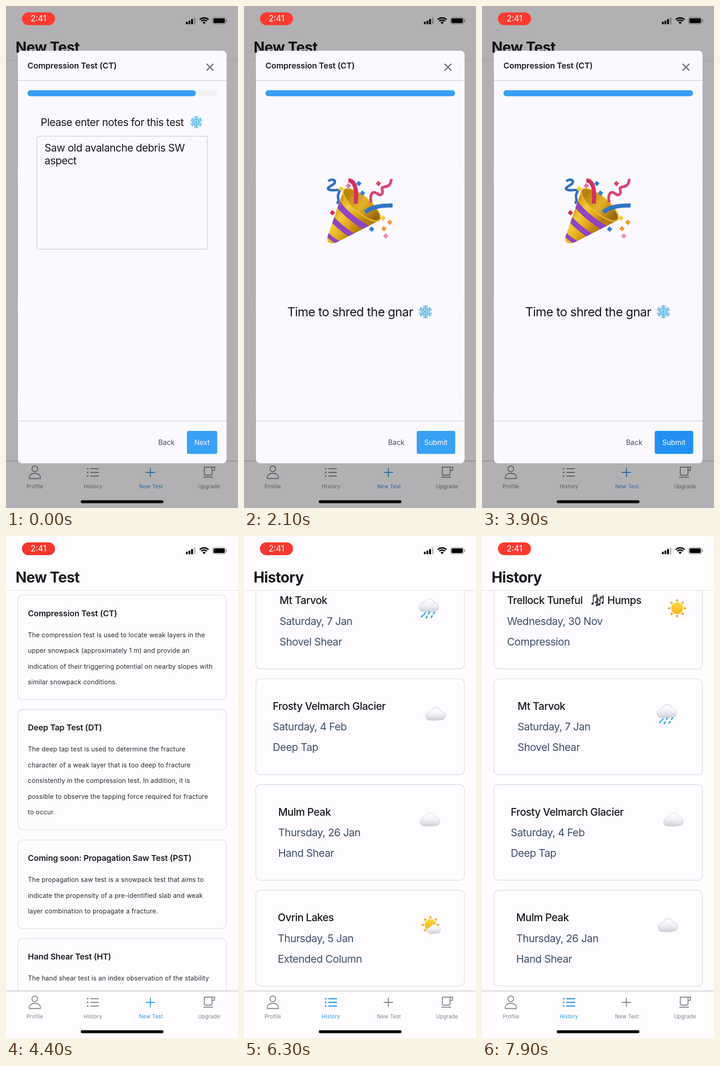
An HTML page with a canvas for the animation above (8 s loop, 509x1100 px).

```html
<!DOCTYPE html>
<html lang="en">
<head>
<meta charset="utf-8">
<title>Snow test log</title>
<style>
  html, body { margin: 0; width: 100%; height: 100%; overflow: hidden; background: #fefcff; }
  canvas { display: block; width: 509px; height: 1100px; }
</style>
</head>
<body>
<canvas id="stage"></canvas>
<script>
const W = 509, H = 1100, LOOP = 8000, STEP = 100;
const SWITCH = 1400, POP = 1600, CLOSE = 4200, HISTORY = 5900, INSERT = 7600;
const PAGE = '#fefcff', INK = '#1b1a1e', SLATE = '#3f4f6a', GRAY = '#7f7e83', BLUE = '#38a0f5';

const canvas = document.getElementById('stage');
const dpr = window.devicePixelRatio || 1;
canvas.width = W * dpr;
canvas.height = H * dpr;
const ctx = canvas.getContext('2d');

// Text styles: weight, size, letter spacing in em
const STYLE = {
  title: [700, 32, -0.02],
  head: [600, 17.8, -0.006],
  body: [400, 14, 0.013],
  large: [400, 23, -0.023],
  name: [500, 22.8, -0.024],
  hero: [400, 27, -0.022],
  button: [400, 15.5, 0],
  tab: [400, 11.3, 0.027],
  clock: [400, 18, 0]
};

const TESTS = [
  { y: 129.5, h: 229, title: 'Compression Test (CT)', lines: [
    'The compression test is used to locate weak layers in the',
    'upper snowpack (approximately 1 m) and provide an',
    'indication of their triggering potential on nearby slopes with',
    'similar snowpack conditions.'] },
  { y: 380.3, h: 263.7, title: 'Deep Tap Test (DT)', lines: [
    'The deep tap test is used to determine the fracture',
    'character of a weak layer that is too deep to fracture',
    'consistently in the compression test. In addition, it is',
    'possible to observe the tapping force required for fracture',
    'to occur.'] },
  { y: 666, h: 194.3, title: 'Coming soon: Propagation Saw Test (PST)', lines: [
    'The propagation saw test is a snowpack test that aims to',
    'indicate the propensity of a pre-identified slab and weak',
    'layer combination to propagate a fracture.'] },
  { y: 882, h: 200, title: 'Hand Shear Test (HT)', lines: [
    'The hand shear test is an index observation of the stability'] }
];

const RECORDS = [
  { x: 55, name: 'Trellock Tuneful', tail: 'Humps', date: 'Wednesday, 30 Nov', test: 'Compression', icon: sun, ix: 428 },
  { x: 78, name: 'Mt Tarvok', date: 'Saturday, 7 Jan', test: 'Shovel Shear', icon: rain, ix: 405.5 },
  { x: 63, name: 'Frosty Velmarch Glacier', date: 'Saturday, 4 Feb', test: 'Deep Tap', icon: cloud, ix: 420 },
  { x: 75, name: 'Mulm Peak', date: 'Thursday, 26 Jan', test: 'Hand Shear', icon: cloud, ix: 408 },
  { x: 74, name: 'Ovrin Lakes', date: 'Thursday, 5 Jan', test: 'Extended Column', icon: sunCloud, ix: 409 }
];

function text(str, x, y, style, color, align = 'left') {
  const [weight, size, spacing] = STYLE[style];
  ctx.font = `${weight} ${size}px Inter, "Noto Sans", sans-serif`;
  ctx.letterSpacing = `${spacing * size}px`;
  ctx.textAlign = align;
  ctx.fillStyle = color;
  ctx.fillText(str, x, y);
}

function box(x, y, w, h, r, fill, line, width = 1.2) {
  ctx.beginPath();
  ctx.roundRect(x, y, w, h, r);
  if (fill) { ctx.fillStyle = fill; ctx.fill(); }
  if (line) { ctx.strokeStyle = line; ctx.lineWidth = width; ctx.stroke(); }
}

function rect(x, y, w, h, fill) {
  ctx.fillStyle = fill;
  ctx.fillRect(x, y, w, h);
}

function disc(x, y, r, fill) {
  ctx.beginPath();
  ctx.arc(x, y, r, 0, 7);
  ctx.fillStyle = fill;
  ctx.fill();
}

function stroke(d, color, width, cap = 'round') {
  ctx.strokeStyle = color;
  ctx.lineWidth = width;
  ctx.lineCap = cap;
  ctx.lineJoin = 'round';
  ctx.stroke(new Path2D(d));
}

function at(x, y, scale, draw) {
  ctx.save();
  ctx.translate(x, y);
  ctx.scale(scale, scale);
  draw();
  ctx.restore();
}

function gradient(x0, y0, x1, y1, ...colors) {
  const g = ctx.createLinearGradient(x0, y0, x1, y1);
  colors.forEach((c, i) => g.addColorStop(i / (colors.length - 1), c));
  return g;
}

// ---- Pictograms ----

function snowflake(x, y, r) {
  at(x, y, r / 14, () => {
    for (const [color, width] of [['#c3e7f6', 3.2], ['#55b4e0', 1.3]]) {
      for (let i = 0; i < 6; i++) {
        ctx.save();
        ctx.rotate(i * Math.PI / 3);
        stroke('M0 0V-12.5M-3.6 -12L0 -8.6L3.6 -12M-3.8 -7.6L0 -4.2L3.8 -7.6', color, width);
        ctx.restore();
      }
    }
  });
}

function cloud(x, y, scale = 1) {
  const puffs = [[-13, 5, 8.5], [12, 3.5, 9.5], [1, -4, 10.3], [-8, 0, 8], [0, 6, 8.2], [6, 5, 8.5], [-6, 6, 8]];
  at(x, y, scale, () => {
    for (const [px, py, r] of puffs) disc(px, py, r + 0.6, '#b9bdc9');
    const fill = gradient(0, -14, 0, 14, '#ffffff', '#f1f2f6', '#cdd0da');
    for (const [px, py, r] of puffs) disc(px, py, r, fill);
  });
}

function rain(x, y) {
  cloud(x, y - 6);
  for (const [dx, dy] of [[-10, 13], [0, 11], [11, 11], [-15, 18], [-5, 20], [6, 19]]) {
    stroke(`M${x + dx + 1.5} ${y + dy - 2.5}L${x + dx - 0.8} ${y + dy + 1}`, '#35a4e6', 3);
  }
}

function sun(x, y, scale = 1) {
  at(x, y, scale, () => {
    for (let i = 0; i < 8; i++) {
      ctx.save();
      ctx.rotate(i * Math.PI / 4);
      ctx.fillStyle = '#f2a526';
      ctx.fill(new Path2D('M-3.4 -15L0 -21.5L3.4 -15Z'));
      ctx.restore();
    }
    disc(0, 0, 13, gradient(0, -13, 0, 13, '#ffd83c', '#f8b51f'));
  });
}

function sunCloud(x, y) {
  sun(x, y - 1, 0.98);
  cloud(x + 7.5, y + 8, 0.69);
}

function notes(x, y) {
  at(x, y, 1, () => {
    stroke('M4 20V3L12 1V17M4 6L12 4', '#2b2b30', 1.8);
    stroke('M19 22V7L26 4V18M19 10L26 7M14 9V23M14 9Q15 13 18 14', '#2b2b30', 1.7);
    for (const [nx, ny] of [[2.4, 21], [10.3, 18], [17, 22.5], [24.3, 19], [12.2, 24]]) disc(nx, ny, 2.4, '#2b2b30');
  });
}

function popper() {
  const cone = new Path2D('M219 402L183 506Q180 521 196 520L203 518L297 470Z');
  const gold = gradient(200, 440, 254, 482, '#d99a12', '#f4cb37', '#e3ab1c', '#b77d10');
  ctx.fillStyle = gold;
  ctx.fill(cone);
  ctx.save();
  ctx.clip(cone);
  stroke('M202 428Q226 462 272 488', '#8f46c0', 13);
  stroke('M190 462Q207 484 242 506', '#8f46c0', 12);
  stroke('M178 495Q190 511 212 521', '#8f46c0', 9);
  ctx.restore();

  ctx.beginPath();
  ctx.ellipse(258.5, 435.5, 51, 18, 0.7, 0, 7);
  ctx.fillStyle = gradient(230, 410, 290, 460, '#b9810f', '#e4b32c', '#9c6a0c');
  ctx.fill();
  ctx.strokeStyle = '#e9bd35';
  ctx.lineWidth = 2.5;
  ctx.stroke();

  stroke('M185 384C192 377 205 382 197 390C188 396 179 400 188 403C200 406 215 398 208 410C202 419 212 424 204 433', '#2f70c6', 5.5, 'butt');
  stroke('M229 382C245 383 248 405 245 433', '#d52f5f', 9, 'butt');
  stroke('M279 431C275 408 284 405 292 411C301 418 306 411 303 402C300 391 322 404 323 379', '#dc4674', 6, 'butt');
  stroke('M266 452C280 440 300 437 326 437', '#2f74cc', 9, 'butt');

  const bits = [
    [213, 401, '#f3cb34'], [229, 394, '#e873a0'], [252, 389, '#327fd8'], [260, 410, '#327fd8'],
    [295, 389, '#e04468'], [194, 453, '#d63054'], [305, 465, '#f5cc38'], [320, 474, '#ee9a35'],
    [307, 488, '#ee9a35'], [280, 489, '#327fd8'], [311, 504, '#eb8cc0']
  ];
  for (const [x, y, color] of bits) {
    ctx.save();
    ctx.translate(x, y);
    ctx.rotate(0.65);
    rect(-4.2, -4.2, 8.4, 8.4, color);
    ctx.restore();
  }
}

// ---- Screens ----

function testList() {
  for (const { y, h, title, lines } of TESTS) {
    box(26, y, 457.5, h, 10, null, '#d8d7db');
    text(title, 48, y + 46, 'head', INK);
    lines.forEach((line, i) => text(line, 48, y + 92 + i * 34.5, 'body', '#29282c'));
  }
}

function historyList(first) {
  for (let i = 0; i < 4; i++) {
    const r = RECORDS[first + i], y = 81.4 + i * 231.6;
    box(26, y, 457.5, 209.8, 10, null, '#d8d7db');
    text(r.name, r.x, y + 68, 'name', INK);
    if (r.tail) {
      notes(240, y + 46);
      text(r.tail, 275, y + 68, 'name', INK);
    }
    text(r.date, r.x, y + 113.3, 'large', SLATE);
    text(r.test, r.x, y + 158.3, 'large', SLATE);
    r.icon(r.ix, y + 77);
  }
}

function tabBar(active) {
  rect(0, 997, W, 103, PAGE);
  rect(0, 996.3, W, 1.4, '#c3c2c6');
  const color = i => i === active ? '#2a94e6' : GRAY;
  ['Profile', 'History', 'New Test', 'Upgrade'].forEach((label, i) =>
    text(label, 63.5 + i * 127.3, 1057.3, 'tab', color(i), 'center'));

  stroke('M69.5 1014.2A6.3 6.3 0 1 1 56.9 1014.2A6.3 6.3 0 1 1 69.5 1014.2M51 1035.5C50 1028 56 1024 63.2 1024C70.5 1024 76.5 1028 75.5 1035.5Z', GRAY, 1.8);
  for (const y of [1014, 1022, 1030]) {
    disc(179.2, y, 1.8, color(1));
    stroke(`M186 ${y}H203`, color(1), active === 1 ? 2.6 : 1.8);
  }
  stroke('M316.7 1012.5V1031.5M307.2 1022H326.2', color(2), 1.9);
  stroke('M435 1010.5H452V1025Q452 1028 449 1028H438Q435 1028 435 1025ZM452 1010.5H458L457 1017.5H452M433.5 1032.5H453.5', GRAY, 1.8);
}

function page(t) {
  const history = t >= HISTORY;
  rect(0, 0, W, H, PAGE);
  ctx.save();
  ctx.beginPath();
  ctx.rect(0, 119, W, 878);
  ctx.clip();
  if (history) historyList(t < INSERT ? 1 : 0);
  else testList();
  ctx.restore();
  rect(0, 118.8, W, 1.2, '#e5e3e7');
  text(history ? 'History' : 'New Test', 21, 101.5, 'title', INK);
  tabBar(history ? 1 : 2);
}

function ease(p) {
  p = Math.min(1, Math.max(0, p));
  return p * p * (3 - 2 * p);
}

function notesStep() {
  text('Please enter notes for this test', 76, 262.5, 'large', '#18171b');
  snowflake(417.5, 254.5, 14);
  box(68, 285.3, 374, 247.5, 4, null, '#c9c8cc');
  text('Saw old avalanche debris SW', 84.5, 318.7, 'large', '#18171b');
  text('aspect', 84.5, 346.7, 'large', '#18171b');
}

function doneStep(t) {
  if (t >= POP) popper();
  text('Time to shred the gnar', 95, 680, 'hero', '#18171b');
  snowflake(398, 670, 15.5);
}

function modal(t) {
  const done = t >= SWITCH;
  box(26, 98, 458, 904, 9, '#fbf9fd');
  rect(26, 162.6, 458, 1.3, '#cfced2');
  rect(26, 908.6, 458, 1.3, '#cfced2');
  text('Compression Test (CT)', 47, 137, 'head', INK);
  stroke('M440 126.7L455 141.7M455 126.7L440 141.7', '#6c6b70', 2.5, 'butt');

  box(47, 184.5, 417, 13.3, 6.6, '#f3f2f5');
  box(47, 184.5, 369.5 + 46.5 * ease((t - SWITCH) / 500), 13.3, 6.6, BLUE);

  if (done) doneStep(t);
  else notesStep();

  const pressed = t >= 3800 || (t >= 1200 && !done);
  const left = done ? 379 : 397;
  box(left, 931, 463.5 - left, 50.5, 4, pressed ? '#2290f2' : BLUE);
  text(done ? 'Submit' : 'Next', (left + 463) / 2, 962, 'button', '#fafcff', 'center');
  text('Back', left - 45, 962, 'button', SLATE, 'center');
}

function statusBar(t) {
  const glow = (1 + Math.cos(t / 2000 * 2 * Math.PI)) / 2;
  const mix = (a, b) => Math.round(a + (b - a) * glow);
  box(35, 14, 72.5, 28, 14, `rgb(${mix(221, 255)}, ${mix(48, 59)}, ${mix(42, 48)})`);
  text('2:41', 71.3, 34.3, 'clock', '#fff', 'center');

  [5.5, 8, 11.5, 15].forEach((h, i) =>
    box(394.7 + i * 5.7, 40 - h, 4, h, 1, i < 3 ? '#000' : 'rgba(0,0,0,.25)'));

  ctx.strokeStyle = '#000';
  ctx.lineCap = 'butt';
  for (const [r, width] of [[13.6, 3], [8.8, 3], [2.5, 5]]) {
    ctx.beginPath();
    ctx.arc(434.7, 39.5, r, -Math.PI * 0.75, -Math.PI * 0.25);
    ctx.lineWidth = width;
    ctx.stroke();
  }

  box(453.3, 25, 28.6, 14.5, 4.3, null, 'rgba(0,0,0,.45)', 1.2);
  box(455.2, 26.9, 24.8, 10.7, 2.8, '#000');
  box(483.2, 29.7, 1.8, 5, 1, 'rgba(0,0,0,.45)');
  box(164, 1083, 181.5, 6.5, 3.2, '#0b0a0d');
}

function draw(t) {
  ctx.setTransform(dpr, 0, 0, dpr, 0, 0);
  page(t);
  const fade = 1 - ease((t - CLOSE) / 200);
  if (fade > 0) {
    rect(0, 0, W, H, `rgba(0,0,0,${0.3 * fade})`);
    ctx.globalAlpha = fade;
    modal(t);
    ctx.globalAlpha = 1;
  }
  statusBar(t);
}

function tick(now) {
  draw(Math.floor(now % LOOP / STEP) * STEP);
  requestAnimationFrame(tick);
}
requestAnimationFrame(tick);
</script>
</body>
</html>
```
